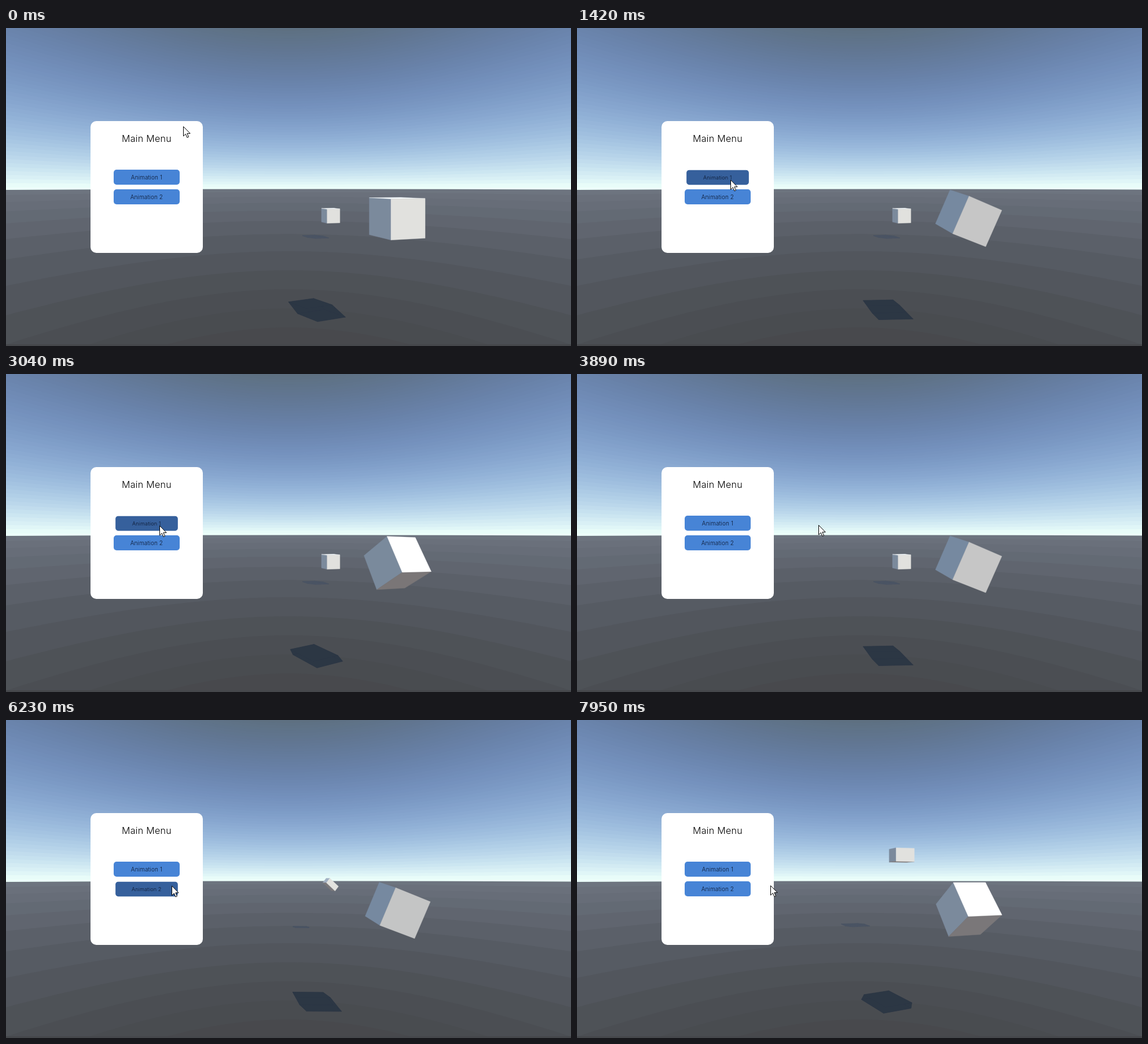
Recreate the animation shown at these times as an HTML page with a canvas. Size 976 by 550 pixels, loop 8 s.

```html
<!DOCTYPE html>
<html lang="en">
<head>
<meta charset="utf-8">
<title>Cube menu</title>
<style>
  html, body { margin: 0; width: 976px; height: 550px; overflow: hidden; background: #48494a; }
  canvas, .panel, .cursor { position: absolute; left: 0; top: 0; }
  .panel {
    left: 146px; top: 161px; width: 194px; height: 228px;
    border-radius: 10px; background: #fff;
    font: 300 10px Inter, "Open Sans", sans-serif; text-align: center;
  }
  .title { position: absolute; left: 0; right: 0; top: 20px; font-size: 16px; line-height: 20px; color: #000; letter-spacing: .3px; }
  .button {
    position: absolute; left: 40.2px; width: 113.5px; height: 26.5px;
    border-radius: 5px; background: #4784d6; color: #0c1830;
    line-height: 27px; letter-spacing: .1px;
  }
  .button.hover { background: #36609c; transform: scale(.945); }
  .button.hover span { display: block; transform: scale(.97); }
  .cursor { width: 16px; height: 24px; overflow: visible; }
</style>
</head>
<body>
<canvas id="backdrop" width="976" height="550"></canvas>
<canvas id="scene" width="976" height="550"></canvas>
<div class="panel">
  <div class="title">Main Menu</div>
  <div class="button" style="top:83.5px"><span>Animation 1</span></div>
  <div class="button" style="top:117.5px"><span>Animation 2</span></div>
</div>
<svg class="cursor" id="cursor" viewBox="0 0 16 24">
  <path d="M0 0V16.5L3.8 12.9L6.4 19L9 17.9L6.4 11.9H11.6Z" fill="#fff" stroke="#000"/>
</svg>
<script>
const W = 976, H = 550, CX = W / 2, CY = H / 2, FOCAL = 610, BAND_FOCAL = 417;
const LOOP = 8000, SPIN_START = 420, SPIN_LENGTH = 2480;
const RAD = Math.PI / 180, YAW = 18 * RAD;
const TO_LIGHT = [.321, .766, -.557];      // world space
const SHADOW_SLOPE = [-.623, .561];        // camera x and z per unit of height

const mix = (a, b, k) => a + (b - a) * k;
const mixAll = (a, b, k) => a.map((v, i) => mix(v, b[i], k));
const clamp = k => Math.max(0, Math.min(1, k));
const smooth = k => k * k * (3 - 2 * k);
const easeOut = power => k => 1 - (1 - k) ** power;
const rgb = c => `rgb(${c.map(v => Math.round(Math.min(255, v))).join()})`;
const dot = (a, b) => a[0] * b[0] + a[1] * b[1] + a[2] * b[2];

// Eased values between the two keys around time t
function tween(keys, t, ease) {
  const next = Math.max(1, keys.findIndex(key => key.at > t));
  const a = keys[next - 1], b = keys[next];
  const k = ease(clamp((t - a.at) / (b.at - a.at)));
  return mixAll(a.pose, b.pose, k);
}

// ---------- sky and ground ----------
const skyColor = d => [88 + 148 * Math.exp(-d / 85), 97 + 158 * Math.exp(-d / 118), 250 - .44 * d];
const groundColor = d => [66 + 44 * Math.exp(-d / 125), 66 + 51 * Math.exp(-d / 135), 64 + 64 * Math.exp(-d / 160)];

function drawBackdrop(ctx) {
  const band = (offset, color) => {
    ctx.fillStyle = rgb(color);
    ctx.beginPath();
    ctx.moveTo(0, H);
    for (let x = 0; x <= W; x += 8) ctx.lineTo(x, CY + offset * Math.hypot(1, (x - CX) / BAND_FOCAL));
    ctx.lineTo(W, H);
    ctx.fill();
  };
  ctx.fillStyle = rgb(skyColor(CY));
  ctx.fillRect(0, 0, W, H);
  for (let d = 270; d > -4; d -= 4.5) band(-d, skyColor(Math.max(0, d - 2)));

  ctx.beginPath();
  ctx.moveTo(0, 280);
  ctx.quadraticCurveTo(CX, 277.5, W, 279.5);
  ctx.lineTo(W, H);
  ctx.lineTo(0, H);
  ctx.clip();
  ctx.fillStyle = rgb(groundColor(2));
  ctx.fillRect(0, 270, W, H);
  for (let d = 9, step = 8; d < CY; d += step, step = Math.min(33, step * 1.3))
    band(d, groundColor(d + step / 2));
  ctx.fillStyle = "#45474b";
  ctx.fillRect(0, 547, W, 3);
}

// ---------- boxes ----------
function rotate([x, y, z], [ax, ay, az]) {
  const turn = (a, b, deg) => {
    const c = Math.cos(deg * RAD), s = Math.sin(deg * RAD);
    return [a * c - b * s, a * s + b * c];
  };
  [x, y] = turn(x, y, az);
  [y, z] = turn(y, z, ax);
  [z, x] = turn(z, x, ay);
  return [x, y, z];
}

const toCamera = ([x, y, z]) => [
  x * Math.cos(YAW) - z * Math.sin(YAW), y, x * Math.sin(YAW) + z * Math.cos(YAW)
];
const project = ([x, y, z]) => [CX + FOCAL * x / z, CY - FOCAL * y / z];

function boxFaces({ center, size, angles }) {
  const faces = [];
  for (let axis = 0; axis < 3; axis++) for (const side of [-1, 1]) {
    const normal = [0, 0, 0];
    normal[axis] = side;
    const corners = [[-1, -1], [1, -1], [1, 1], [-1, 1]].map(([u, v]) => {
      const p = [...normal];
      p[(axis + 1) % 3] = u;
      p[(axis + 2) % 3] = v;
      return toCamera(rotate(p.map((c, i) => c * size[i] / 2), angles)).map((c, i) => c + center[i]);
    });
    faces.push({ normal: rotate(normal, angles), corners });
  }
  return faces;
}

function shade(normal) {
  const y = normal[1];
  const ambient = mixAll([123, 138, 156], y > 0 ? [108, 134, 168] : [122, 114, 112], Math.abs(y));
  const lit = Math.max(0, dot(normal, TO_LIGHT));
  return rgb(ambient.map((c, i) => c + lit * [183, 156, 118][i]));
}

function fillPolygon(ctx, points, color) {
  ctx.fillStyle = ctx.strokeStyle = color;
  ctx.lineWidth = .4;
  ctx.beginPath();
  points.forEach(p => ctx.lineTo(...p));
  ctx.closePath();
  ctx.fill();
  ctx.stroke();
}

function drawBox(ctx, box) {
  for (const { normal, corners } of boxFaces(box))
    if (dot(toCamera(normal), corners[0]) < 0) fillPolygon(ctx, corners.map(project), shade(normal));
}

function drawShadow(ctx, box, ground, color, fit = p => p) {
  const drop = ([x, y, z]) => {
    const h = y + ground;
    return [x + SHADOW_SLOPE[0] * h, -ground, z + SHADOW_SLOPE[1] * h];
  };
  for (const { corners } of boxFaces(box))
    fillPolygon(ctx, corners.map(p => fit(project(drop(p)))), color);
}

// ---------- motion ----------
const LEAN = [37, -2, 0], REST = [-8.2, 5.6, -21.4];

// Tips forward quickly, then sways into its resting tilt
function spinAngles(t) {
  if (t < SPIN_START) return [0, 0, 0];
  const time = (t - SPIN_START) % SPIN_LENGTH;
  const tip = clamp(time / 90), settle = clamp((time - 90) / 900);
  const [x, y, z] = mixAll(LEAN, REST, easeOut(2)(settle)).map(a => a * tip);
  return [x, y - 32 * Math.sin(2 * Math.PI * settle) * (1 - settle), z];
}

// pose: height, size x y z, turn y z
const FLIGHT = [
  { at: 4950, pose: [-2.07, 1, 1, 1, 0, 0] },
  { at: 5250, pose: [-2.07, .55, .5, .55, -22, 0] },
  { at: 7100, pose: [-.21, .95, .42, .6, 0, -45] },
  { at: 7950, pose: [1.72, 1.42, .95, 1.25, 0, 0] }
];

const POINTER = [
  { at: 0, pose: [306.5, 170.5] },
  { at: 420, pose: [265.5, 263] },
  { at: 3340, pose: [265.5, 262.5] },
  { at: 3600, pose: [370, 200] },
  { at: 3890, pose: [417.5, 261.5] },
  { at: 4650, pose: [288, 287.5] },
  { at: 7490, pose: [285.5, 286.5] },
  { at: 7950, pose: [334.5, 286.5] },
  { at: LOOP, pose: [334.5, 286.5] }
];
FLIGHT.push({ ...FLIGHT[3], at: LOOP });

const scene = document.getElementById("scene").getContext("2d");
const cursor = document.getElementById("cursor");
const buttons = [...document.querySelectorAll(".button")];
const fitNear = ([x, y]) => [537 + (x - 544) * .88, 487.5 + (y - 488) * 1.12];

function render(t) {
  const near = { center: [2.81, -.79, 9.21], size: [1, 1, 1], angles: spinAngles(t) };
  const [height, sx, sy, sz, ay, az] = tween(FLIGHT, t, easeOut(3));
  const far = { center: [3.05, height, 25.6], size: [sx, sy, sz], angles: [0, ay, az] };

  scene.clearRect(0, 0, W, H);
  drawShadow(scene, far, 3.74, "#4b5464");
  drawShadow(scene, near, 3.78, "#2c3744", fitNear);
  drawBox(scene, far);
  drawBox(scene, near);

  const [x, y] = tween(POINTER, t, smooth);
  cursor.style.transform = `translate(${x}px, ${y}px)`;
  buttons.forEach((button, i) => {
    const top = 245 + i * 34;
    button.classList.toggle("hover", x > 187 && x < 300 && y > top && y < top + 27);
  });
}

drawBackdrop(document.getElementById("backdrop").getContext("2d"));
const start = performance.now();
function tick() {
  render((performance.now() - start) % LOOP);
  requestAnimationFrame(tick);
}
tick();
</script>
</body>
</html>
```
